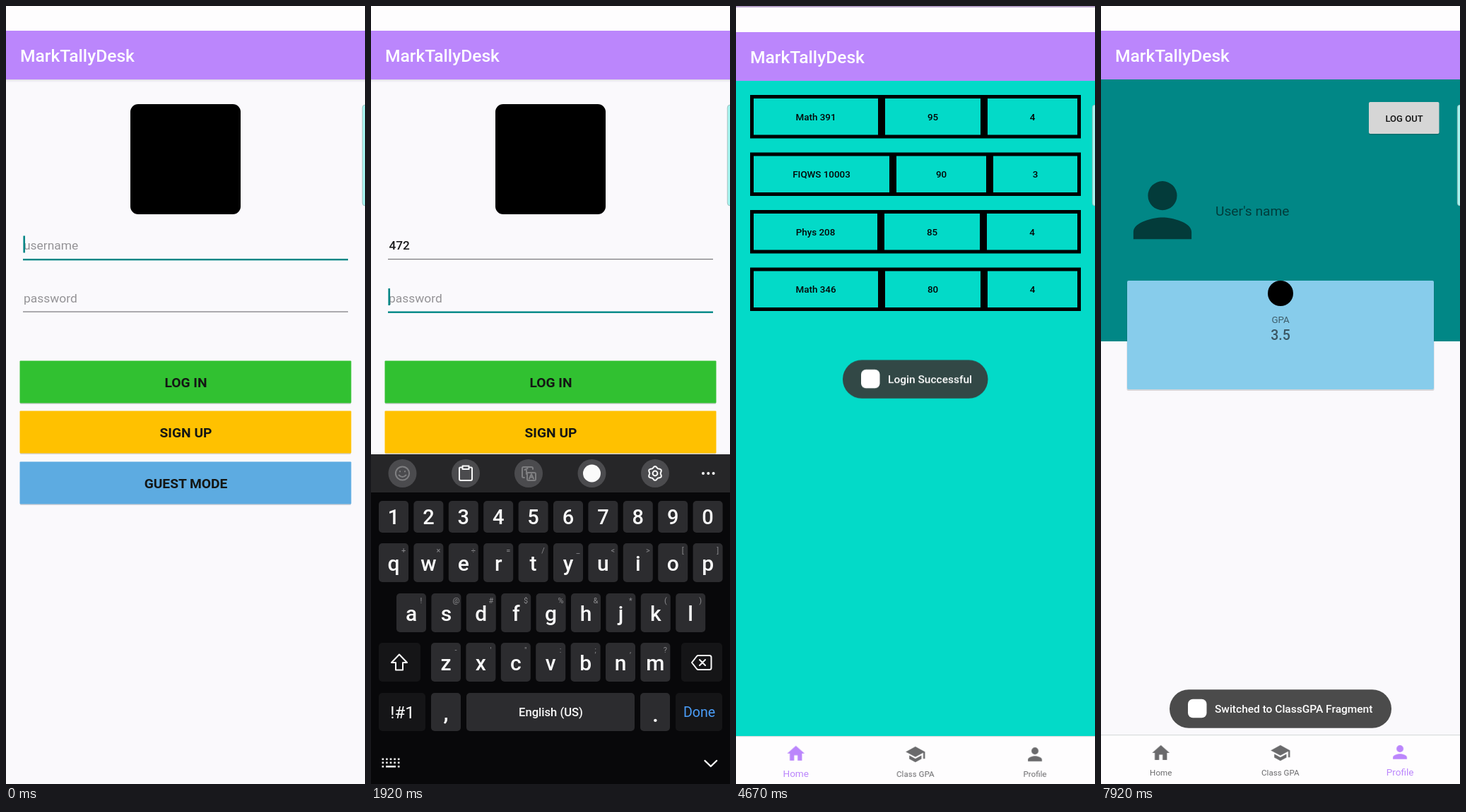
Recreate the animation shown at these times as an HTML page. Size 508 by 1102 pixels, loop 8 s.

```html
<!DOCTYPE html>
<html lang="en">
<head>
<meta charset="utf-8">
<title>Grades demo</title>
<style>
html, body { margin: 0; width: 100%; height: 100%; overflow: hidden; background: #faf9fc; }
svg { display: block; width: 100vw; height: 100vh; font-family: Roboto, "Noto Sans", sans-serif; }
.mid { text-anchor: middle; }
.med { font-weight: 500; }
.bold { font-weight: 600; }
.line { fill: none; stroke: #fafafa; stroke-width: 2; stroke-linecap: round; stroke-linejoin: round; }
</style>
</head>
<body>
<svg id="stage" viewBox="0 0 508 1102" preserveAspectRatio="none"></svg>
<script>
const LOOP = 8000;
const TEAL = '#018786', VIOLET = '#bb86fc', GREY = '#6a6a6c', KEY = '#2c2c2f', PAGE = '#faf9fc';
const APP = 'MarkTallyDesk', USER = '472';

// ---- timing helpers: stops are { ms: declarations } ----
let css = '', count = 0;
const track = (sel, ease, stops) => {
  const name = 'track' + count++;
  const list = Object.entries(stops);
  list.push([LOOP, list[list.length - 1][1]]);
  const frames = list.map(([ms, rule]) => `${ms * 100 / LOOP}%{${rule}}`).join('');
  css += `@keyframes ${name}{${frames}}\n${sel}{animation:${name} ${LOOP}ms ${ease} infinite}\n`;
};
const show = (sel, from, to = LOOP) => {
  const stops = { 0: 'opacity:0' };
  stops[from] = 'opacity:1';
  if (to < LOOP) stops[to] = 'opacity:0';
  track(sel, 'step-end', stops);
};
const press = (digit, ...times) => {
  const stops = { 0: `fill:${KEY}` };
  for (const t of times) {
    stops[t - 20] = 'fill:#58585c';
    stops[t + 90] = `fill:${KEY}`;
  }
  track('#key' + digit, 'step-end', stops);
};

// ---- drawing helpers ----
const rect = (x, y, w, h, fill, more = '') =>
  `<rect x="${x}" y="${y}" width="${w}" height="${h}" fill="${fill}" ${more}/>`;
const text = (x, y, size, str, fill = '#111', more = '') =>
  `<text x="${x}" y="${y}" font-size="${size}" fill="${fill}" ${more}>${str}</text>\n`;
const centred = (x, y, size, str, fill, cls = '') =>
  text(x, y, size, str, fill, `class="mid ${cls}"`);
const group = (id, body) => `<g id="${id}">${body}</g>`;

const topBar = () =>
  rect(0, 0, 508, 35, '#fefdfe') + rect(0, 35, 508, 69, VIOLET) +
  text(20, 79, 24.6, APP, '#fff', 'class="med"');

// ---- sign-in screen ----
const button = (y, label, fill) =>
  rect(20, y + 50, 468, 11, '#d5d4d8', 'rx="1"') + rect(19.5, y - .5, 469, 60, fill, 'rx="1"') +
  centred(254.5, y + 36.7, 19.2, label, '#141614', 'bold');

const field = (id, y, hint, typed) =>
  group(id + 'Hint', text(25, y, 17.4, hint, '#949396')) + typed +
  group(id + 'Idle', rect(24, y + 13, 460, 1.2, '#77777a')) +
  group(id + 'Live', rect(24, y + 13, 460, 2.4, TEAL)) +
  rect(24.4, y - 19.5, 2.6, 24, TEAL, `id="${id}Caret"`);

const typedUser = [...USER].map((c, i) =>
  group('u' + i, text(25.5 + i * 9.7, 345, 17.2, c, '#1a1a1c', 'class="med"'))).join('');
const typedPass = [0, 1, 2].map(i =>
  group('p' + i, `<circle cx="${29.7 + i * 7.7}" cy="413.5" r="3.7" fill="#1a1a1c"/>`)).join('');

const signIn =
  rect(0, 0, 508, 1102, PAGE) + rect(0, 104, 508, 1.5, '#dedbe3') + rect(0, 105.5, 508, 2, '#f0eef3') +
  topBar() + rect(176, 139, 156, 156, '#000', 'rx="11"') +
  field('user', 345, 'username', typedUser) + field('pass', 419.5, 'password', typedPass) +
  button(503, 'LOG IN', '#31c131') + button(574, 'SIGN UP', '#ffc100') + button(646, 'GUEST MODE', '#5dabe1');

// ---- keyboard ----
const PITCH = 49.4;
const key = (x, y, w, h, fill = KEY, more = '') => rect(x, y, w, h, fill, `rx="5" ${more}`);
const letters = (str, hints, x, y) => [...str].map((c, i) => {
  const left = x + i * PITCH;
  return key(left, y, 42, 55) + centred(left + 21, y + 38.7, 30, c, '#fafafa', 'med') +
    centred(left + 35, y + 13.5, 11, hints[i], '#8b8b8e');
}).join('');
const digits = Array.from({ length: 10 }, (_, i) => {
  const d = (i + 1) % 10, left = 11 + i * PITCH;
  return key(left, 701, 42, 45, KEY, `id="key${d}"`) + centred(left + 21, 734, 29, d, '#fafafa', 'med');
}).join(' ');

const gear = Array.from({ length: 48 }, (_, i) => {
  const a = i * Math.PI / 24, r = 8.8 + 1.1 * Math.cos(6 * a);
  return `${(402 + r * Math.sin(a)).toFixed(1)},${(662 - r * Math.cos(a)).toFixed(1)}`;
}).join(' ');

const tools =
  [44.5, 134, 223, 312.5, 402].map(x => `<circle cx="${x}" cy="662" r="20" fill="#4b4b4e"/>`).join('') +
  `<g class="line">
    <g class="dimmed"><circle cx="44.5" cy="662" r="9.6"/><path d="M41 659v.4M48 659v.4M39.5 664.5q5 5 10 0"/></g>
    <path d="M129 653.5h-2.5q-1.5 0-1.5 1.5v15q0 2 2 2h14q2 0 2-2v-15q0-1.5-1.5-1.5h-2.5M129.5 651.5h9v4.5h-9z"/>
    <g class="dimmed"><path d="M217 668h-1q-2 0-2-2v-11q0-2 2-2h11q2 0 2 2v1M217.5 657l4-2M220 658v5M221 661h10q2 0 2 2v7q0 2-2 2h-8q-2 0-2-2zM224 669.5l3-6.5 3 6.5M225 667.5h4"/></g>
    <polygon points="${gear}"/><circle cx="402" cy="662" r="3.4"/>
  </g>
  <circle cx="312.5" cy="662" r="12.5" fill="#fafafa"/>` +
  [470, 477.3, 484.6].map(x => `<circle cx="${x}" cy="662" r="2" fill="#fafafa"/>`).join('');

const miniKeys = Array.from({ length: 10 }, (_, i) =>
  rect(15.5 + (i % 5) * 5.6, 1065.5 + (i > 4) * 5, 2.6, 2.6, '#e8e8e8')).join('') +
  rect(15.5, 1076, 2.6, 2.6, '#e8e8e8') + rect(21, 1076, 14, 2.6, '#e8e8e8') + rect(37.9, 1076, 2.6, 2.6, '#e8e8e8');

const DARK = '#151517';
const keyboard =
  rect(0, 635, 508, 467, '#08080a') + rect(0, 635, 508, 54, '#262628') + tools + digits +
  letters('qwertyuiop', ['+', '×', '÷', '=', '/', '_', '&lt;', '&gt;', '[', ']'], 11, 761) +
  letters('asdfghjkl', ['!', '@', '#', '$', '%', '&amp;', '*', '(', ')'], 36, 832) +
  letters('zxcvbnm', ['-', "'", '"', ':', ';', ',', '?'], 85, 902) +
  key(11, 902, 59, 55, DARK) + key(439, 902, 58, 55, DARK) +
  `<path class="line" d="M40 918.5l11 11.5h-6v10.5h-10v-10.5h-6z"/>
   <path class="line" d="M454 930l7-9q1-1 2-1h16q2.5 0 2.5 2.5v15q0 2.5-2.5 2.5h-16q-1 0-2-1zM465 926l8 8M473 926l-8 8"/>` +
  key(11, 973, 66, 54, DARK) + centred(44.5, 1008.5, 24, '!#1', '#fafafa') +
  key(85, 973, 42, 54) + centred(106, 1012, 32, ',', '#fafafa', 'med') +
  key(135, 973, 238, 54) + centred(254.5, 1006, 16.6, 'English (US)', '#fafafa', 'med') +
  key(381, 973, 42, 54) + centred(402.5, 1014, 32, '.', '#fafafa', 'med') +
  key(431, 973, 66, 54, DARK) +
  group('next', centred(464, 1007, 20, 'Next', '#4a9df8')) +
  group('done', centred(464.5, 1007, 19.6, 'Done', '#4a9df8')) +
  miniKeys + '<path class="line" style="stroke-width:2.4" d="M472.5 1069l8.3 8 8.3-8"/>';

// ---- signed-in pages; a and b are the left edges of the two dividers ----
const table = (x, y, w, fill, rows) => rows.map(([a, b, ...words], i) => {
  const top = y + i * 81.5, ends = [x - 5, a, b, x + w - 5];
  return rect(x, top, w, 61.5, '#000') + words.map((word, j) => {
    const left = ends[j] + 10, width = ends[j + 1] - left;
    return rect(left, top + 5, width, 51.5, fill) +
      centred(left + width / 2, top + 35.7, 13.4, word, '#050505', 'med');
  }).join('');
}).join('');

const AQUA = '#03dac8';
const homePage = rect(0, 104, 508, 929, AQUA) + table(20, 124, 468, AQUA, [
  [201, 346, 'Math 391', 95, 4], [217, 354, 'FIQWS 10003', 90, 3],
  [200, 345, 'Phys 208', 85, 4], [201, 346, 'Math 346', 80, 4]]);
const classPage = rect(0, 104, 508, 929, TEAL) + table(10, 111.5, 485, TEAL, [
  [183, 337, 'Exams', 50, 80], [200.5, 346, 'Homework', 20, 95],
  [201, 342, 'Attendence', 10, 100], [175, 333, 'Labs', 10, 97]]);

const PERSON = 'M12 12a4 4 0 1 0 0-8 4 4 0 0 0 0 8zm0 2c-2.67 0-8 1.34-8 4v2h16v-2c0-2.66-5.33-4-8-4z';
const profilePage =
  rect(0, 104, 508, 929, PAGE) + rect(0, 104, 508, 371, TEAL) +
  rect(379, 137, 99.5, 45.5, '#036f6e', 'rx="2"') + rect(379, 136, 99.5, 45, '#d6d6d6', 'rx="2"') +
  centred(429, 164, 13, 'LOG OUT', '#111', 'med') +
  `<path transform="translate(25.3 227.5) scale(5.14)" fill="#033b3a" d="${PERSON}"/>` +
  text(162, 297, 19.2, "User's name", '#023d3c') +
  rect(36.5, 390, 435, 155, '#000', 'rx="2" opacity=".14"') + rect(37, 389, 434, 154, '#87cceb', 'rx="2"') +
  '<circle cx="254" cy="407" r="18" fill="#000"/>' +
  centred(254, 448.7, 13.3, 'GPA', '#3f5e6b') + centred(254, 473.2, 19.5, '3.5', '#3a5663', 'med');

const tabs = [
  { label: 'Home', x: 84.7, from: 0, to: 5670, icon: 'M10 20v-6h4v6h5v-8h3L12 3 2 12h3v8z' },
  { label: 'Class GPA', x: 253.8, from: 5670, to: 6580,
    icon: 'M5 13.18v4L12 21l7-3.82v-4L12 17zM12 3L1 9l11 6 9-4.91V17h2V9z' },
  { label: 'Profile', x: 423, from: 6580, to: LOOP, icon: PERSON }
];
const nav = rect(0, 1033, 508, 69, '#fefdfe') + rect(0, 1032, 508, 1.2, '#d8dcdc') +
  tabs.map((tab, i) => `<g id="tab${i}">
    <g transform="translate(${tab.x - 14.8} 1043.2) scale(1.236)"><path d="${tab.icon}"/></g>
    <g transform="translate(${tab.x} 1089.7)"><text class="mid" font-size="11.6">${tab.label}</text></g></g>`).join('');

const main =
  rect(0, -2, 508, 2, '#b7a3ca') + rect(0, 0, 508, 1102, PAGE) + topBar() +
  homePage + group('classPage', classPage) + group('profilePage', profilePage) + nav;

const toast = (id, x, y, w, words) => group(id,
  rect(x, y, w, 54.5, '#383838', 'rx="27.2" fill-opacity=".9"') +
  rect(x + 26, y + 13.5, 26.5, 26.5, '#fff', 'rx="7"') +
  text(x + 64, y + 33, 15.5, words, '#fff', 'class="med"'));

document.getElementById('stage').innerHTML =
  signIn + group('keyboard', keyboard) + group('main', main) +
  toast('loginToast', 151, 501.8, 205.5, 'Login Successful') +
  toast('tabToast', 97, 968.2, 314, 'Switched to ClassGPA Fragment') +
  rect(504.3, 140, 12, 143, '#a6f4ef', 'rx="4" stroke="#9db4b4" stroke-width=".8"');

// ---- timeline ----
const userKeys = [850, 1100, 1350], passKeys = [2190, 2850, 3090], FOCUS = 1670;
userKeys.forEach((t, i) => show('#u' + i, t));
passKeys.forEach((t, i) => show('#p' + i, t));
show('#userHint', 0, userKeys[0]);
show('#passHint', 0, passKeys[0]);
show('#userLive', 0, FOCUS);
show('#userIdle', FOCUS);
show('#passLive', FOCUS);
show('#passIdle', 0, FOCUS);
show('#next', 0, FOCUS);
show('#done', FOCUS);
track('.dimmed', 'step-end', { 0: 'opacity:1', [FOCUS]: 'opacity:.3' });

const caret = (on, x = 0) => `opacity:${on};transform:translateX(${x}px)`;
track('#userCaret', 'step-end', {
  0: caret(1), 420: caret(0), [userKeys[0]]: caret(1, 10), [userKeys[1]]: caret(1, 19.6),
  [userKeys[2]]: caret(1, 29.3), [FOCUS]: caret(0)
});
track('#passCaret', 'step-end', {
  0: caret(0), [FOCUS]: caret(1), [passKeys[0]]: caret(1, 8.6), [passKeys[1]]: caret(1, 16.2),
  [passKeys[2]]: caret(1, 23.7), 3670: caret(0, 23.7), 4170: caret(1, 23.7)
});

press(4, userKeys[0]);
press(7, userKeys[1]);
press(1, passKeys[0]);
press(2, userKeys[2], passKeys[1]);
press(3, passKeys[2]);

const shift = y => `transform:translateY(${y}px)`;
const OUT = ';animation-timing-function:cubic-bezier(.2,.7,.3,1)';
track('#keyboard', 'linear', {
  0: shift(467), 75: shift(467) + OUT, 250: shift(0), 4420: shift(0) + OUT, 4660: shift(467)
});
track('#main', 'linear', {
  0: 'opacity:0;' + shift(90), 4410: 'opacity:0;' + shift(90) + OUT,
  4560: 'opacity:1;' + shift(14), 4670: 'opacity:1;' + shift(2), 4750: 'opacity:1;' + shift(0)
});
show('#classPage', 5670);
show('#profilePage', 6580);

tabs.forEach(({ from, to }, i) => {
  const states = (off, on) => {
    const stops = { 0: from ? off : on };
    if (from) Object.assign(stops, { [from + 90]: off, [from + 250]: on });
    if (to < LOOP) Object.assign(stops, { [to + 90]: on, [to + 250]: off });
    return stops;
  };
  const tint = { 0: `fill:${GREY}` };
  tint[from] = `fill:${VIOLET}`;
  if (to < LOOP) tint[to] = `fill:${GREY}`;
  track('#tab' + i, 'step-end', tint);
  track(`#tab${i} text`, 'ease-in-out', states('transform:scale(1)', 'transform:scale(1.17)'));
  track(`#tab${i} path`, 'ease-in-out', states(shift(0), shift(-.9)));
});

const fade = (a, y = 0) => `opacity:${a};` + shift(y);
track('#loginToast', 'linear', {
  0: fade(0, -59.5), 4240: fade(0, -59.5), 4330: fade(.36, -59.5), 4420: fade(.85, -59.5),
  4500: fade(1, -40), 4660: fade(1, -.4), 4760: fade(1), 6570: fade(1), 6750: fade(0)
});
track('#tabToast', 'linear', { 0: fade(0), 6780: fade(0), 7050: fade(1) });

const sheet = document.createElement('style');
sheet.textContent = css;
document.head.append(sheet);
</script>
</body>
</html>
```
